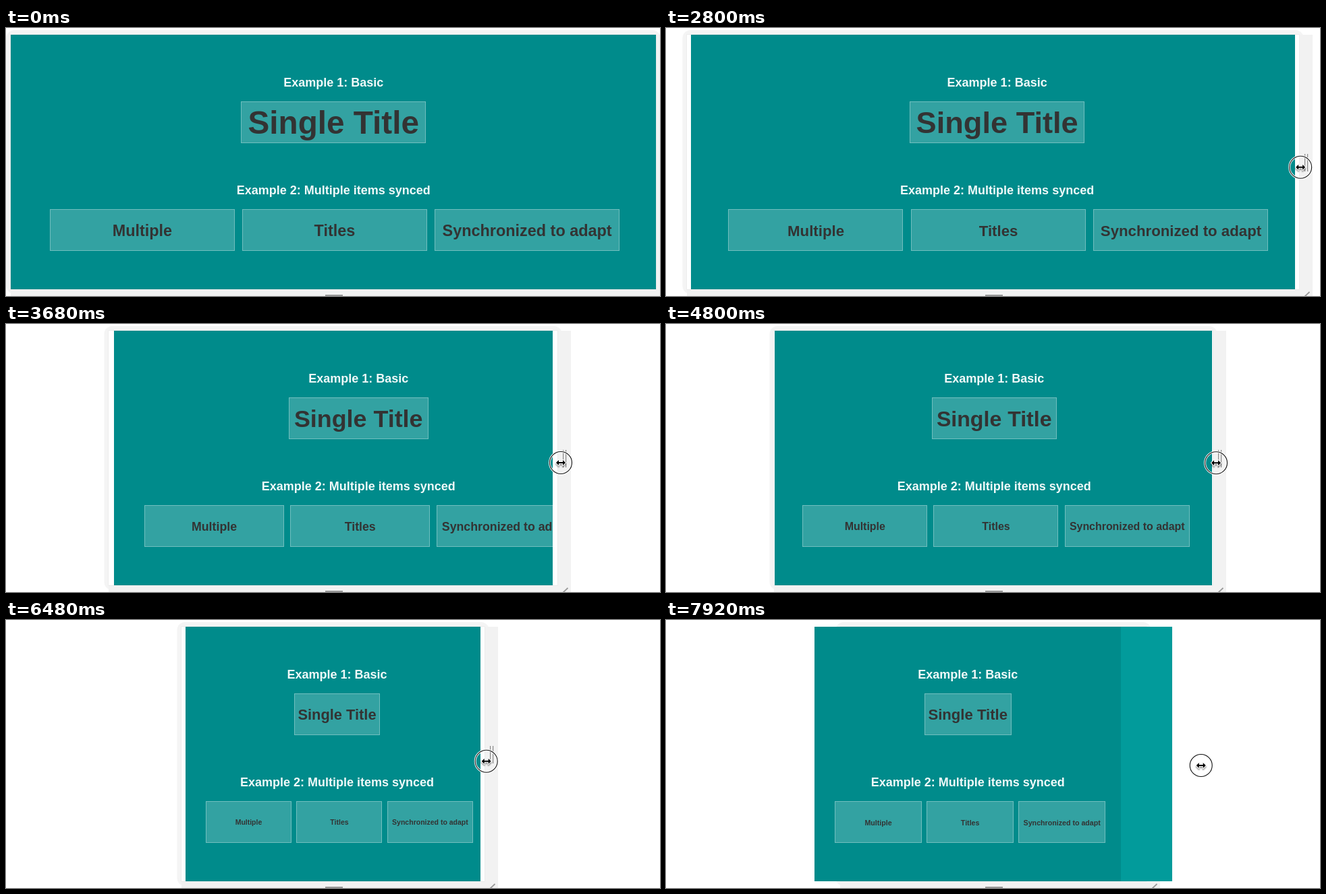
An HTML page with a canvas that plays this animation: 969 by 398 pixels, repeating every 8000 ms.

```html
<!DOCTYPE html>
<html lang="en">
<head>
<meta charset="utf-8">
<title>Fitted titles</title>
<style>
html, body { margin: 0; width: 100%; height: 100%; overflow: hidden; background: #fff; }
canvas { display: block; }
</style>
</head>
<body>
<canvas id="stage" width="969" height="398"></canvas>
<script>
const ctx = document.getElementById('stage').getContext('2d');
const LOOP = 8000, STEP = 80, MIRROR = 969.5;
const TOP = 10, BOTTOM = 388, BAR = 20;
const POINTER_LEAD = 55, POINTER_GAP = 12, VIEWPORT_LAG = 80, LAYOUT_PERIOD = 160;

const easeIn = k => k ** 1.4;
const easeOut = k => 1 - (1 - k) ** 1.55;
const smooth = k => k ** 3 * (6 * k * k - 15 * k + 10);
const lerp = (a, b, k) => a + (b - a) * k;
const between = (t, a, b) => t >= a && t < b;
const progress = (t, a, b) => Math.min(1, Math.max(0, (t - a) / (b - a)));

// Each drag moves the right edge to x while the hand drifts to y.
const drags = [
  { start: 2240, end: 3200, x: 898, y: 210, ease: easeIn },
  { start: 3330, end: 3680, x: 810, y: 206, ease: smooth },
  { start: 4730, end: 5240, x: 739.3, y: 209, ease: smooth },
  { start: 5280, end: 5360, x: 731, y: 209, ease: smooth },
  { start: 6160, end: 6800, x: 689, y: 210, ease: easeOut },
  { start: 7760, end: 8000, x: 796, y: 217, ease: easeIn }
];

function grip(t) {
  let x = 963, y = 203;
  for (const d of drags) {
    const k = d.ease(progress(t, d.start, d.end));
    x = lerp(x, d.x, k);
    y = lerp(y, d.y, k);
  }
  return { x, y };
}

// The page reflows less often than its edge moves.
function layoutWidth(t) {
  const last = Math.floor((t - 1) / LAYOUT_PERIOD) * LAYOUT_PERIOD;
  return 2 * grip(last).x - MIRROR;
}

function span(edge) {
  const left = Math.round(MIRROR - edge), right = Math.round(edge);
  return { left, right, width: right - left };
}

function rect(x, y, w, h, color) {
  ctx.fillStyle = color;
  ctx.fillRect(x, y, w, h);
}

function label(text, x, y, size, color) {
  ctx.font = `bold ${size}px "Liberation Sans", Arial, sans-serif`;
  ctx.textAlign = 'center';
  ctx.fillStyle = color;
  ctx.fillText(text, x, y);
}

function card(text, x, y, w, size, baseline) {
  const left = Math.round(x), width = Math.round(w);
  rect(left, y, width, 62, 'rgba(255,255,255,.2)');
  ctx.strokeStyle = 'rgba(255,255,255,.3)';
  ctx.lineWidth = 1;
  ctx.strokeRect(left + .5, y + .5, width - 1, 61);
  label(text, x + w / 2, baseline, size, '#333');
}

function drawPage(edge, width) {
  const { left, width: visible } = span(edge);
  ctx.save();
  ctx.beginPath();
  ctx.rect(left, TOP, visible, BOTTOM - TOP);
  ctx.clip();
  ctx.translate(left, 0);
  rect(0, TOP, visible, BOTTOM - TOP, '#008b8b');
  if (visible > width + BAR) rect(Math.round(width), TOP, visible, BOTTOM - TOP, '#029b9b');

  const middle = width / 2;
  const cardWidth = .2882 * width - 2, pitch = .2968 * width + 1.2;
  const titleSize = .0509 * width - 1;
  const itemSize = .0245 * width - Math.max(0, 520 - width) * .007;
  label('Example 1: Basic', middle, 86.5, 18, '#f0f9f9');
  card('Single Title', middle - cardWidth / 2, 109, cardWidth, titleSize, 140 + titleSize * .36);
  label('Example 2: Multiple items synced', middle, 247, 18, '#f0f9f9');
  ['Multiple', 'Titles', 'Synchronized to adapt'].forEach((text, i) =>
    card(text, 4.7 + .0558 * width + i * pitch, 269, cardWidth, itemSize, 300.7 + itemSize * .36));
  ctx.restore();
}

function drawViewport(edge, hovered) {
  const { left, right, width } = span(edge), height = BOTTOM - TOP;
  ctx.fillStyle = '#f4f4f4';
  ctx.beginPath();
  ctx.roundRect(left - 6.5, 3, width + 13, 392, 12);
  ctx.fill();
  rect(left, BOTTOM, width + BAR, 10, '#f2f2f2');
  rect(right, TOP, BAR, height, hovered ? '#dadada' : '#f2f2f2');
  rect(left - .5, TOP - .5, width + 1, height + 1, '#e4e4e4');
  rect(left, TOP, width, height, '#fff');
  for (const dx of [8, 12]) rect(right + dx, 187, 1.2, 26, '#888');
  ctx.beginPath();
  ctx.moveTo(right + 8, 399);
  ctx.lineTo(right + 15.5, 392);
  ctx.strokeStyle = '#999';
  ctx.lineWidth = 1.8;
  ctx.stroke();
  rect(473, 396, 26, 2, '#999');
}

function drawPointer(x, y, trace) {
  ctx.save();
  ctx.translate(x, y);
  for (const [color, width] of [['#fff', 3], ['#111', 1.1]]) {
    ctx.beginPath();
    ctx.arc(0, 0, 16.5, 0, Math.PI * 2);
    ctx.strokeStyle = color;
    ctx.lineWidth = width;
    ctx.stroke();
  }
  ctx.beginPath();
  trace();
  ctx.closePath();
  ctx.lineJoin = 'round';
  ctx.shadowColor = 'rgba(0,0,0,.4)';
  ctx.shadowBlur = 2;
  ctx.shadowOffsetY = 2;
  ctx.strokeStyle = '#fff';
  ctx.lineWidth = 2;
  ctx.stroke();
  ctx.shadowColor = 'transparent';
  ctx.fillStyle = '#000';
  ctx.fill();
  ctx.restore();
}

// Half of the double arrow, mirrored through its centre.
function resizeArrow() {
  for (const s of [1, -1]) {
    for (const [x, y] of [[-3, 1], [-3, 4], [-7, 0], [-3, -4], [-3, -1]]) ctx.lineTo(s * x, s * y);
  }
}

function selectArrow() {
  for (const [x, y] of [[0, 0], [0, 12], [3, 9.5], [5, 14], [7, 13], [5, 8.8], [8.5, 8.5]]) ctx.lineTo(x, y);
}

function draw(t) {
  rect(0, 0, 969, 398, '#fff');
  const hovered = between(t, 3200, 3440) || between(t, 7520, 7840);
  drawViewport(grip(t - VIEWPORT_LAG).x, hovered);
  drawPage(grip(t).x, layoutWidth(t));

  if (between(t, 160, 1040)) {
    const k = smooth(progress(t, 160, 800));
    drawPointer(lerp(639, 985.5, k), lerp(377, 225, k), selectArrow);
  } else if (t >= 2320) {
    const hand = grip(t + POINTER_LEAD);
    drawPointer(hand.x + POINTER_GAP, hand.y, resizeArrow);
  }
}

const start = performance.now();
function tick() {
  const t = (performance.now() - start) % LOOP;
  draw(Math.floor(t / STEP) * STEP);
  requestAnimationFrame(tick);
}
tick();
</script>
</body>
</html>
```
